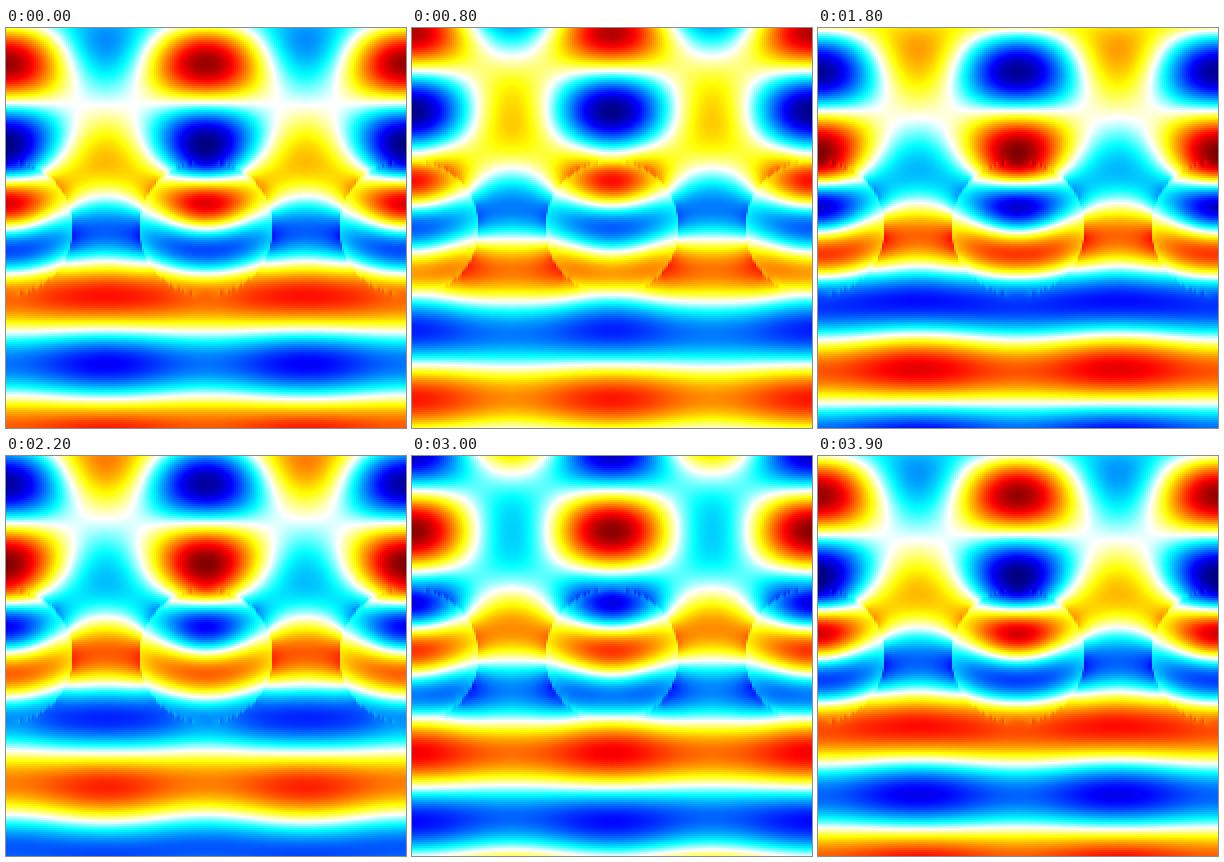
A matplotlib script for the animation above (4000 ms loop, 400 by 400 pixels).

```python
"""Plane wave passing a row of dielectric cylinders: the transverse electric field."""
import numpy as np
import matplotlib.pyplot as plt
from matplotlib.animation import FuncAnimation
from matplotlib.colors import LinearSegmentedColormap

SIZE = 400             # stage, px
CELL = 2               # grid cell, px
PERIOD = 200           # spacing of the cylinders, px
WAVELENGTH = PERIOD / 1.5
RADIUS = WAVELENGTH / 2
INDEX = 1.5            # refractive index of the cylinders
FRAMES, INTERVAL = 40, 100

ROWS, COLS = SIZE // CELL, PERIOD // CELL
KAPPA = 2 * np.pi * CELL / WAVELENGTH


def permittivity():
    """One period of the row, with cylinders centred on its side edges."""
    x = (np.arange(COLS) + 0.5) * CELL
    x = np.minimum(x, PERIOD - x)
    y = (np.arange(ROWS) + 0.5) * CELL - SIZE / 2
    inside = x**2 + y[:, None]**2 < RADIUS**2
    return np.where(inside, INDEX**2, 1.0)


def outgoing_steps():
    """Factor per row for each diffraction order leaving the grid."""
    a = 2 - np.cos(2 * np.pi * np.arange(COLS) / COLS) - KAPPA**2 / 2
    root = np.sqrt(np.abs(a**2 - 1))
    return np.where(np.abs(a) < 1, a + 1j * root, a - root)


def solve_field():
    """Complex horizontal electric field for a wave coming from below."""
    eps = permittivity()
    eye = np.eye(COLS)
    diff = np.roll(eye, 1, axis=1) - eye
    padded = np.vstack([np.ones(COLS), eps, np.ones(COLS)])
    w = 2 / (padded[:-1] + padded[1:])

    z = outgoing_steps()
    outward = np.fft.ifft(z[:, None] * np.fft.fft(eye, axis=0), axis=0)

    # Sweep down: each step maps a row of H to the row above it.
    steps = [outward]
    for j in range(ROWS):
        u = 2 / (eps[j] + np.roll(eps[j], -1))
        lateral = -diff.T @ (u[:, None] * diff)
        m = (w[j][:, None] * (steps[-1] - eye) - np.diag(w[j + 1])
             + lateral + KAPPA**2 * eye)
        steps.append(-np.linalg.solve(m, np.diag(w[j + 1])))

    # The incident wave has zero phase at the lower edge of the stage.
    incident = np.exp(-0.5j * KAPPA) * (1 - z[0]**2) * np.ones(COLS)
    rows = [np.linalg.solve(eye - outward @ steps[-1], incident)]
    for step in reversed(steps):
        rows.append(step @ rows[-1])
    h = np.array(rows[::-1])

    e = w * (h[:-1] - h[1:]) / (1j * KAPPA)
    return np.tile((e[:-1] + e[1:]) / 2, (1, SIZE // PERIOD))


field = solve_field()
peak = np.abs(field).max()

cmap = LinearSegmentedColormap.from_list("wave", [
    (0.0, (0, 0, 0.5)),
    (0.125, (0, 0, 1)),
    (0.375, (0, 1, 1)),
    (0.5, (1, 1, 1)),
    (0.625, (1, 1, 0)),
    (0.875, (1, 0, 0)),
    (1.0, (0.5, 0, 0)),
], N=512)

fig = plt.figure(figsize=(SIZE / 100, SIZE / 100), dpi=100)
ax = fig.add_axes([0, 0, 1, 1])
ax.axis("off")
image = ax.imshow(field.real, cmap=cmap, vmin=-peak, vmax=peak,
                  interpolation="nearest", aspect="auto")


def draw(frame):
    image.set_data((field * np.exp(-2j * np.pi * frame / FRAMES)).real)
    return [image]


anim = FuncAnimation(fig, draw, frames=FRAMES, interval=INTERVAL,
                     repeat=True, repeat_delay=0, blit=False)
plt.show()
```
